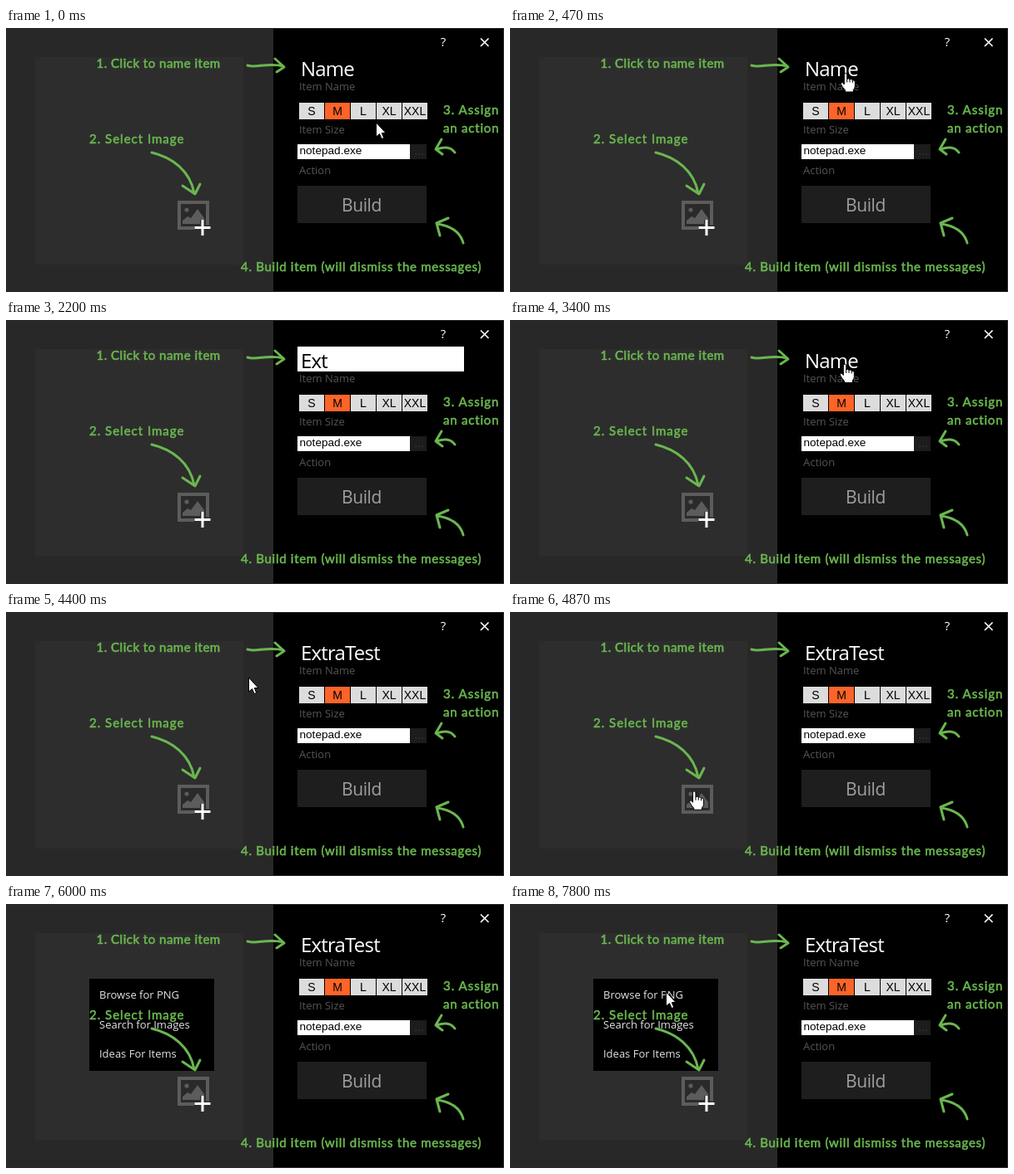
Recreate the animation shown at these times as an HTML page. Size 598x318 px, loop 8 s.

```html
<!DOCTYPE html>
<html lang="en">
<head>
<meta charset="utf-8">
<title>Item builder</title>
<style>
  html, body { margin: 0; width: 100%; height: 100%; overflow: hidden; background: #000; }
  svg { display: block; width: 598px; height: 318px; }
  text { white-space: pre; }
  .ui { font-family: "Open Sans", "Noto Sans", sans-serif; font-size: 13px; }
  .label { fill: #555; }
  .menu { fill: #e2e2e2; }
  .name { font-size: 24px; letter-spacing: -.8px; }
  .build { font-size: 21px; letter-spacing: -.4px; fill: #a0a0a0; }
  .arial { font-family: "Liberation Sans", Arial, sans-serif; }
  .note text { font-family: Lato, "Open Sans", sans-serif; font-size: 15px; fill: #6ab64f; stroke: #6ab64f; stroke-width: .6; }
  .note path { fill: none; stroke: #6ab64f; stroke-width: 3; stroke-linecap: round; stroke-linejoin: round; }
</style>
</head>
<body>
<svg viewBox="0 0 598 318">
  <rect width="598" height="318" fill="#000"/>
  <rect width="321" height="318" fill="#282828"/>
  <rect x=".5" y=".5" width="597" height="317" fill="none" stroke="#2b2b2b"/>
  <rect x="35" y="35" width="250" height="250" fill="#2d2d2d"/>

  <g id="icon">
    <rect x="208" y="210" width="34" height="31" fill="#2a2a2a" stroke="#5c5c5c" stroke-width="4"/>
    <circle cx="217" cy="219" r="2.6" fill="#5c5c5c"/>
    <path d="M212 236V232L218 227L222 229L230 218L238 229V236Z" fill="#5c5c5c"/>
  </g>
  <g id="plus">
    <path d="M226 240.5H246M236 231V250" stroke="#2d2d2d" stroke-width="6"/>
    <path d="M226.500 240.5H245.500M236 231V250" stroke="#fff" stroke-width="3"/>
  </g>

  <text class="ui" x="525" y="22" text-anchor="middle" style="font-size:15px" fill="#fff">?</text>
  <path d="M570 12.500L579.500 22M579.500 12.500L570 22" stroke="#fff" stroke-width="1.7"/>

  <g id="field">
    <rect x="350" y="32" width="200" height="30" fill="#fff"/>
    <rect id="selection" x="354" y="32" width="65" height="30" fill="#3797f5"/>
  </g>
  <text id="name" class="ui name" x="354" y="58"></text>

  <g class="ui label">
    <text x="352" y="75">Item Name</text>
    <text x="352" y="127">Item Size</text>
    <text x="352" y="176">Action</text>
  </g>

  <g id="sizes" class="arial" font-size="14" text-anchor="middle"></g>

  <rect x="350" y="140" width="135" height="18" fill="#fff"/>
  <text class="arial" x="352.500" y="152" font-size="13.6">notepad.exe</text>
  <rect x="485" y="140" width="20" height="18" fill="#1c1c1c"/>
  <text class="arial" x="496" y="153" font-size="14" text-anchor="middle" fill="#3c3c3c">...</text>

  <rect x="350" y="190" width="155" height="45" fill="#1e1e1e"/>
  <text class="ui build" x="427" y="220.500" text-anchor="middle">Build</text>

  <g id="menu" class="ui menu">
    <rect x="100" y="90" width="150" height="111" fill="#000"/>
    <text x="112" y="114">Browse for PNG</text>
    <text x="112" y="150">Search for Images</text>
    <text x="112" y="185">Ideas For Items</text>
  </g>

  <g class="note">
    <text x="108.500" y="48" letter-spacing=".5">1. Click to name item</text>
    <text x="100" y="139" letter-spacing="1">2. Select Image</text>
    <text x="525" y="104" letter-spacing="1">3. Assign</text>
    <text x="525" y="126" letter-spacing=".8">an action</text>
    <text x="282" y="293" letter-spacing=".72">4. Build item (will dismiss the messages)</text>
    <path d="M290 45C300 49 314 41 333 46M323 37L334 47L325 53"/>
    <path d="M175 150C200 156 221 172 226 199M212 190L227 200L233 188"/>
    <path d="M539 150C534 143 527 143 517 146M523 134L516 146L524 152"/>
    <path d="M549 259C546 247 537 239 518 236M531 229L517 235L521 250"/>
  </g>

  <circle id="busy" cx="201.500" cy="106.500" r="5.800" fill="none" stroke="#7cc3e6" stroke-width="3"/>
  <g id="arrow" stroke="#000" stroke-width="1" stroke-linejoin="round">
    <path d="M-.500 -1V16L3.500 12.600L6.200 18.500L8.700 17.400L6.300 11.500H11Z" fill="#fff"/>
  </g>
  <g id="hand" stroke="#000" stroke-width="1" stroke-linejoin="round">
    <path d="M-1.700 1.200Q0 -1.200 1.700 1.200V7Q3.500 5.600 5 7.400Q7 6.400 8.300 8.300Q10.900 7.800 11.300 10.400V15.500Q11.200 18 9.300 20V22.500H-.500V20.500Q-3.500 17.500 -5.700 13Q-5.800 10.400 -3.600 11.200L-1.700 13.500Z" fill="#fff"/>
    <path d="M1.700 7V11M5 7.400V11M8.300 8.300V11.500" fill="none"/>
  </g>
</svg>
<script>
const LOOP = 8000, TICK = 1000 / 15;
const $ = id => document.getElementById(id);
const show = (id, on) => $(id).setAttribute("display", on ? "inline" : "none");

$("sizes").innerHTML = ["S", "M", "L", "XL", "XXL"].map((label, i) => {
  const x = 352 + i * 31;
  return `<rect x="${x}" y="90" width="30" height="20" fill="${label === "M" ? "#fc6429" : "#dcdcdc"}"/>
    <text x="${x + 15}" y="105">${label}</text>`;
}).join("");

const START = [445, 115], TITLE = [402, 53], ICON = [234, 226], ITEM = [188, 107];
const moves = [
  { from: 0, to: 533, pts: [START, TITLE], ease: true },
  { from: 4200, to: 5000, pts: [TITLE, [292, 80], [238, 133], [218, 204], ICON] },
  { from: 5333, to: 5933, pts: [ICON, ITEM], ease: true }
];

// Time at which each letter is typed.
const keys = [1800, 2000, 2200, 2400, 2470, 2800, 3000, 3070, 3130];
const TITLE_TEXT = "ExtraTest";

// Catmull-Rom curve through evenly timed points.
function along(pts, u) {
  const n = pts.length - 1, s = u * n, i = Math.min(n - 1, Math.floor(s)), f = s - i;
  const p = k => pts[Math.max(0, Math.min(n, k))];
  return [0, 1].map(d => {
    const [a, b, c, e] = [p(i - 1)[d], p(i)[d], p(i + 1)[d], p(i + 2)[d]];
    return b + f / 2 * (c - a + f * (2 * a - 5 * b + 4 * c - e + f * (3 * (b - c) + e - a)));
  });
}

function cursorAt(t) {
  const q = Math.floor((t + 4) / TICK) * TICK;
  const move = moves.filter(m => q >= m.from - 1).pop() || moves[0];
  let u = Math.max(0, Math.min(1, (q - move.from) / (move.to - move.from)));
  if (move.ease) u = u * u * (3 - 2 * u);
  return along(move.pts, u);
}

function draw(t) {
  const editing = t >= 800 && t < 3400;
  const selected = editing && t < 1800;
  const typed = TITLE_TEXT.slice(0, keys.filter(k => t >= k).length);
  show("field", editing);
  show("selection", selected);
  $("name").textContent = t >= 3530 ? TITLE_TEXT : editing && !selected ? typed : "Name";
  $("name").setAttribute("fill", editing && !selected ? "#000" : "#fff");

  const [x, y] = cursorAt(t);
  const visible = !(t >= 1800 && t < 3400) && !(t >= 6000 && t < 7800);
  const onIcon = x > 206 && x < 245 && y > 207 && y < 244;
  const onTitle = x < 420 && x > 350 && y < 62 && (t < 870 || t >= 3400) && t < 4000;
  const hand = onIcon || onTitle;
  show("arrow", visible && !hand);
  show("hand", visible && hand);
  for (const id of ["arrow", "hand"]) $(id).setAttribute("transform", `translate(${x} ${y})`);

  show("plus", !onIcon);
  show("menu", t >= 5130);
  show("busy", t >= 6200 && t < 6270);
}

const t0 = performance.now();
function frame() {
  draw((performance.now() - t0) % LOOP);
  requestAnimationFrame(frame);
}
frame();
</script>
</body>
</html>
```
